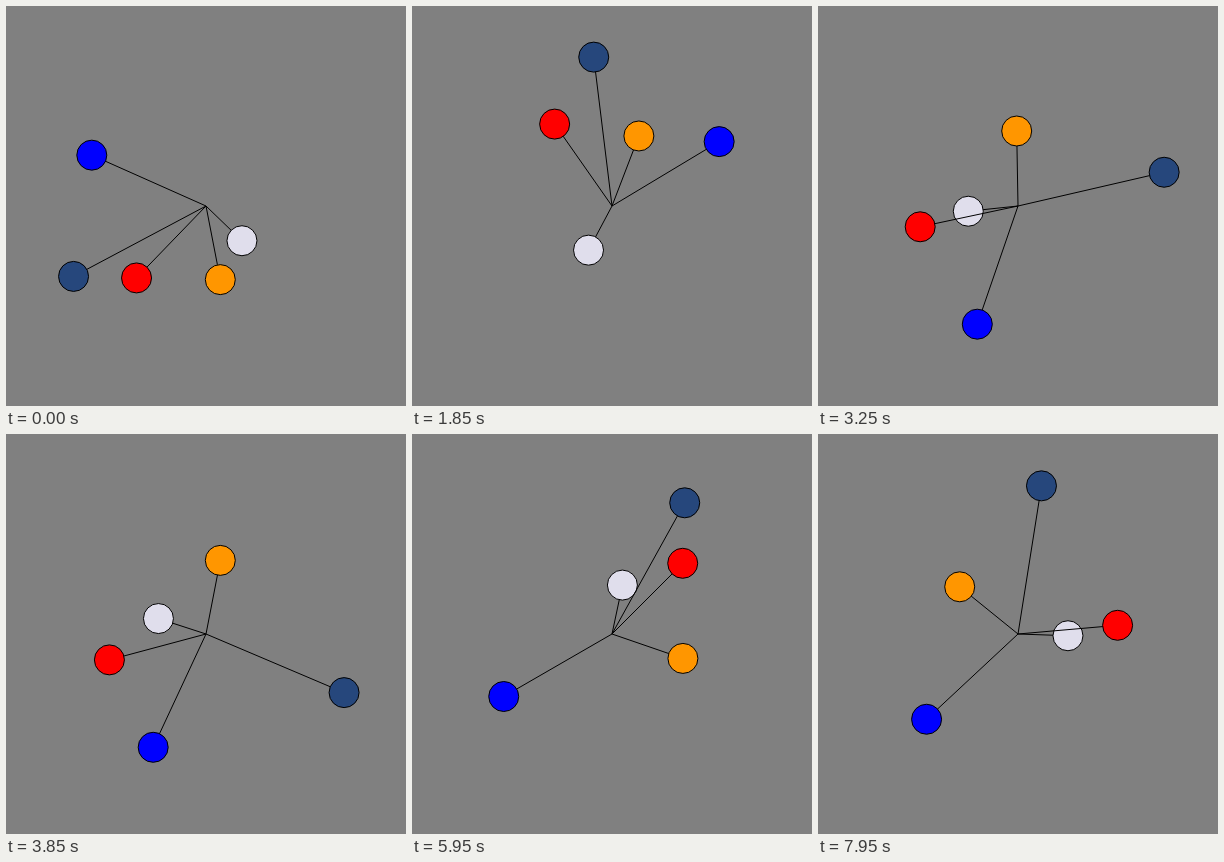
An HTML page with a canvas that plays this animation: 400 px wide and 400 px high, repeating every 8000 ms.

```html
<!DOCTYPE html>
<html lang="en">
<head>
<meta charset="utf-8">
<title>Orbiting balls</title>
<style>
  html, body { margin: 0; width: 100%; height: 100%; overflow: hidden; background: #808080; }
  canvas { display: block; width: 400px; height: 400px; }
</style>
</head>
<body>
<canvas id="stage" width="400" height="400"></canvas>
<script>
const STEP = 50, STEPS = 160, CENTER = 200, RADIUS = 15;
const ctx = document.getElementById('stage').getContext('2d');

// orbit radius, start angle and speed in degrees, colour
const balls = [
  { orbit: 50,  angle: 44,  speed: 2,  color: '#e0deec' },
  { orbit: 75,  angle: 79,  speed: -4, color: '#ff9600' },
  { orbit: 100, angle: 134, speed: 5,  color: '#ff0000' },
  { orbit: 125, angle: 204, speed: 1,  color: '#0000ff' },
  { orbit: 150, angle: 152, speed: 3,  color: '#26477c' }
];

function place({ orbit, angle }) {
  const a = angle * Math.PI / 180;
  return [CENTER + orbit * Math.cos(a), CENTER + orbit * Math.sin(a)];
}

function touching(a, b) {
  const [ax, ay] = place(a), [bx, by] = place(b);
  return Math.hypot(ax - bx, ay - by) < 2 * RADIUS;
}

// Neighbours swap speeds on contact; the innermost ball never collides.
function advance() {
  balls.forEach((ball, i) => {
    ball.angle += ball.speed;
    const next = balls[i + 1];
    if (i > 0 && next && touching(ball, next)) {
      [ball.speed, next.speed] = [next.speed, ball.speed];
    }
  });
}

const poses = Array.from({ length: STEPS }, () => {
  const pose = balls.map(place);
  advance();
  return pose;
});

function draw(pose) {
  ctx.fillStyle = '#808080';
  ctx.fillRect(0, 0, 400, 400);
  ctx.strokeStyle = '#000';
  ctx.lineWidth = 1;
  pose.forEach(([x, y], i) => {
    ctx.beginPath();
    ctx.moveTo(CENTER, CENTER);
    ctx.lineTo(x, y);
    ctx.stroke();
    ctx.beginPath();
    ctx.arc(x, y, RADIUS, 0, 2 * Math.PI);
    ctx.fillStyle = balls[i].color;
    ctx.fill();
    ctx.stroke();
  });
}

const start = performance.now();
function tick() {
  const elapsed = performance.now() - start;
  draw(poses[Math.floor(elapsed / STEP) % STEPS]);
  requestAnimationFrame(tick);
}
tick();
</script>
</body>
</html>
```
